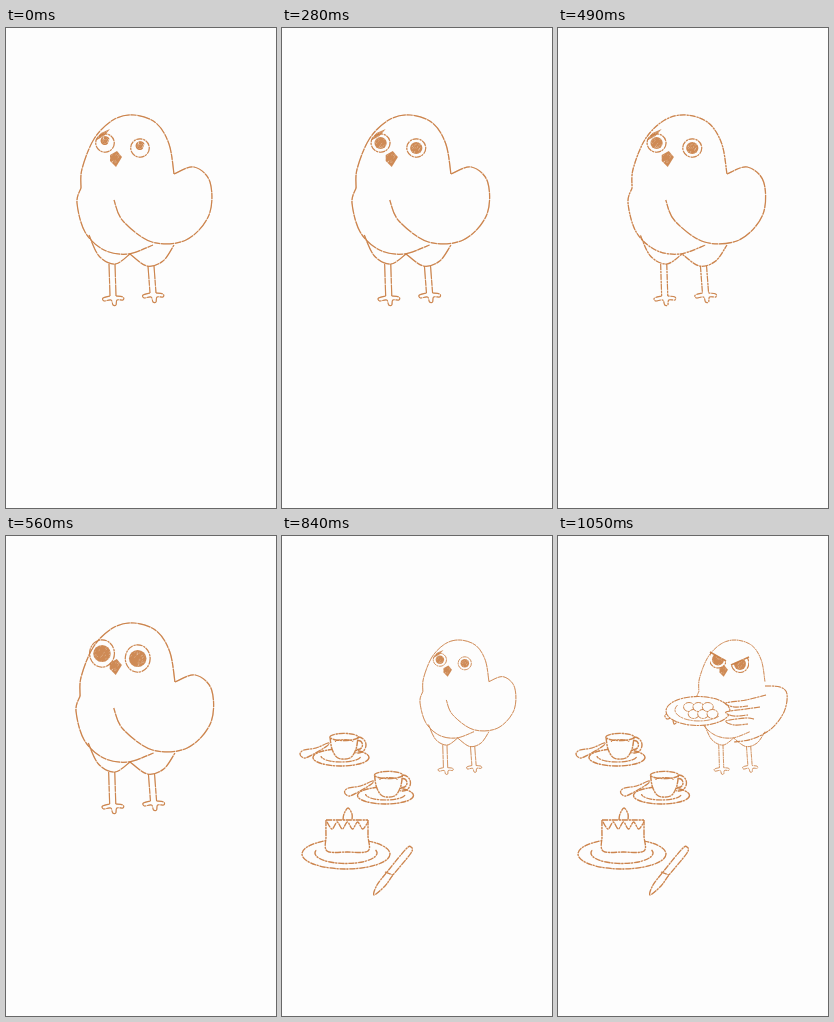
An HTML page with a canvas that plays this animation: 270x480 px, repeating every 1120 ms.

```html
<!DOCTYPE html>
<html lang="en">
<head>
<meta charset="utf-8">
<title>Owl and tea table</title>
<style>
html, body { margin: 0; width: 100%; height: 100%; overflow: hidden; background: #fdfdfd; }
canvas { display: block; width: 100vw; height: 100vh; }
</style>
</head>
<body>
<canvas id="stage"></canvas>
<script>
const W = 270, H = 480, STEP = 70, LOOP = 1120;
const INK = '#c97d42', PAPER = '#fdfdfd';
const FIRM = [13, .8, 6, 1], LOOSE = [6, 1.1, 2, .8];
const canvas = document.getElementById('stage');
const ctx = canvas.getContext('2d');
const ratio = window.devicePixelRatio || 1;
canvas.width = W * ratio;
canvas.height = H * ratio;

const points = text => text.split(' ').map(p => p.split(',').map(Number));

// Smooth curve through key points
function curve(keys, closed = false) {
  const p = typeof keys === 'string' ? points(keys) : keys;
  const n = p.length, path = new Path2D();
  const at = i => closed ? p[(i + n) % n] : p[Math.max(0, Math.min(n - 1, i))];
  path.moveTo(...p[0]);
  for (let i = 0; i < (closed ? n : n - 1); i++) {
    const a = at(i - 1), b = at(i), c = at(i + 1), d = at(i + 2);
    path.bezierCurveTo(b[0] + (c[0] - a[0]) / 6, b[1] + (c[1] - a[1]) / 6,
      c[0] - (d[0] - b[0]) / 6, c[1] - (d[1] - b[1]) / 6, c[0], c[1]);
  }
  return path;
}

function poly(text) {
  const path = new Path2D();
  points(text).forEach(p => path.lineTo(...p));
  return path;
}

function oval(x, y, rx, ry = rx, from = 0, to = Math.PI * 2) {
  const path = new Path2D();
  path.ellipse(x, y, rx, ry, 0, from, to);
  return path;
}

// Crayon line: faint base with broken darker strokes on top
function line(path, width = 1.25, dash = LOOSE, shift = 0) {
  ctx.lineWidth = width * .8;
  ctx.globalAlpha = .35;
  ctx.setLineDash([]);
  ctx.stroke(path);
  ctx.lineWidth = width;
  ctx.globalAlpha = .9;
  ctx.setLineDash(dash);
  ctx.lineDashOffset = shift;
  ctx.stroke(path);
  ctx.globalAlpha = 1;
  ctx.setLineDash([]);
}

// Outline that hides what lies behind it
function cover(path, width) {
  ctx.fillStyle = PAPER;
  ctx.fill(path);
  ctx.fillStyle = INK;
  line(path, width);
}

function random(seed) {
  return () => (seed = (seed * 16807) % 2147483647) / 2147483647;
}

// Solid patch with small gaps in the crayon
function shade(path, x, y, r) {
  const next = random(Math.round(x * 7 + y));
  ctx.save();
  ctx.globalAlpha = .9;
  ctx.fill(path);
  ctx.clip(path);
  ctx.globalAlpha = .5;
  ctx.strokeStyle = PAPER;
  ctx.lineWidth = .5;
  for (let i = 0; i < r * 4; i++) {
    const px = x + (next() * 2 - 1) * r, py = y + (next() * 2 - 1) * r;
    ctx.beginPath();
    ctx.moveTo(px, py);
    ctx.lineTo(px + 1.3, py - 1);
    ctx.stroke();
  }
  ctx.restore();
}

function spiral(x, y, r) {
  const path = new Path2D(), turns = 6 * Math.PI;
  for (let a = 0; a <= turns; a += .3) {
    path.lineTo(x + Math.cos(a) * r * a / turns, y + Math.sin(a) * r * a / turns);
  }
  line(path, 1.3, FIRM);
}

const head = curve('75,160 76,141 88,111 107,92 128,87 150,95 163,116 168,146');
const belly = curve('75,160 71,175 79,204 98,222 122,226 147,217');
const wing = curve('168,146 188,139 204,154 203,187 180,212 146,214 117,193 108,172');
const hips = [curve('83,207 93,228 109,236 124,226'), curve('124,226 141,238 157,233 168,217')];
const beak = poly('104,127 111,123 116,129 110,139 104,133');
const brow = poly('89,113 95,105 104,101 98,108');

function leg(x, top, bottom, lean, dash) {
  for (const side of [-3, 3]) line(poly(`${x + side},${top} ${x + side + lean},${bottom}`), 1.15, dash);
  const f = x + lean;
  const toes = [[-3, 0], [-10, 2], [-9, 5], [-2, 4], [0, 9], [3, 9], [4, 4], [10, 4], [10, 1], [3, 0]];
  line(curve(toes.map(([dx, dy]) => [f + dx, bottom + dy])), 1.15, dash);
}

function frame(tick) {
  const dash = tick % 2 ? LOOSE : FIRM, shift = tick % 2 * 5;
  [head, belly, ...hips].forEach((p, i) => line(p, 1.25, dash, shift + i * 7));
  leg(106, 236, 268, 1, dash);
  leg(145, 238, 265, 2, dash);
  shade(beak, 110, 131, 7);
}

// Pupils widen step by step, then the whole eye pops open
function eyes(tick, popped) {
  const pupil = popped ? 8.6 : Math.min(6, 4.5 + tick * .4);
  const up = tick < 2 ? 2 : 0, push = popped ? 2.5 : 0;
  for (const [x, y] of [[99, 115], [134, 120]]) {
    const cx = x - push, cy = y + push;
    line(oval(cx, cy, popped ? 12.2 : 9.3, popped ? 13.7 : 9.2), 1.15);
    if (up) spiral(cx, cy - up, pupil);
    else shade(oval(cx, cy, pupil), cx, cy, pupil);
  }
  if (!popped) shade(brow, 96, 107, 6);
}

function owl(tick, popped) {
  frame(tick);
  line(wing, 1.25, FIRM, tick % 2 * 5);
  eyes(tick, popped);
}

function placed(x, y, sx, sy, paint) {
  ctx.save();
  ctx.translate(x, y);
  ctx.scale(sx, sy);
  paint();
  ctx.restore();
}

const spoon = curve('46,207 34,212 22,214 18,218 22,222 30,219 45,210', true);
const bowl = curve('48,201 50,213 56,222 68,222 74,213 76,201');

function cup() {
  line(spoon);
  line(oval(59, 221.5, 28, 8.5), 1.35);
  line(oval(59, 220, 20, 6, .2, Math.PI), 1.2);
  for (const r of [8, 4.5]) line(oval(76, 209, r, r, -1.6, 1.9), 1.3);
  cover(bowl, 1.35);
  cover(oval(62, 201, 14, 3.6), 1.35);
  line(oval(62, 206, 9, 2.5, Math.PI, Math.PI * 2), 1);
}

function cake() {
  line(oval(64, 318, 44, 15), 1.3);
  line(oval(64, 317, 31, 10.5, -.3, Math.PI + .3), 1.3);
  cover(curve('44,284 44,300 45,315 65,316 86,315 86,300 86,284'), 1.3);
  const icing = [];
  for (let i = 0; i <= 8; i++) icing.push([45 + i * 5.1, i % 2 ? 293 : 286]);
  line(curve(icing), 1.3);
  line(poly('44,284 86,284'), 1.3);
  line(curve('61,284 62,278 66,272 70,278 70,284'), 1.3);
}

function knife() {
  line(curve('92,359 95,349 105,336 124,313 129,311 129,317 111,339 103,350', true), 1.3);
  line(poly('103,336 111,339'), 1.3);
}

function table() {
  cup();
  placed(44.5, 38, 1, 1, cup);
  cake();
  knife();
}

// Eye cut off by a slanted lid
function angryEye(x1, y1, x2, y2) {
  const x = (x1 + x2) / 2, y = (y1 + y2) / 2 + 2;
  ctx.save();
  ctx.clip(poly(`${x1},${y1} ${x2},${y2} ${x2},${y2 + 30} ${x1},${y1 + 30}`));
  line(oval(x, y, 8.8, 9.5), 1.1);
  shade(oval(x, y + 1, 6), x, y + 1, 6);
  ctx.restore();
  line(poly(`${x1},${y1} ${x2},${y2}`), 1.5, FIRM);
}

const servingWing = curve('207,150 222,151 229,158 226,176 213,193 194,203 176,206');

function platter() {
  line(servingWing, 1.1);
  line(curve('113,176 107,179 109,183 114,182 116,188 119,186'), 1.1);
  cover(oval(140, 175, 32, 14.5), 1.1);
  line(oval(141, 174, 24, 11, .6, 3.6), .8);
  for (let i = 0; i < 6; i++) {
    cover(oval(131 + i * 4.7, i % 2 ? 178 : 171, 5.5, 4.5), .9);
  }
  for (let i = 0; i < 3; i++) {
    const y = 167 + i * 9;
    cover(curve(`${208 - i * 6},${y - 8 + i * 3} 188,${y - 3} 168,${y} 176,${y + 4} 190,${y + 3}`), 1.1);
  }
}

function draw(time) {
  const tick = Math.floor(time / STEP);
  const tableSet = time >= 700, serving = time >= 980, popped = time >= 560;
  ctx.setTransform(ratio, 0, 0, ratio, 0, 0);
  ctx.fillStyle = PAPER;
  ctx.fillRect(0, 0, W, H);
  ctx.fillStyle = ctx.strokeStyle = INK;
  ctx.lineJoin = 'round';
  if (!tableSet) {
    const wide = tick < 3 ? 1 : 1.02;
    placed(121 - 121 * wide, 0, wide, 1, () => owl(popped ? 8 : tick, popped));
    return;
  }
  table();
  placed(87.5, 42.7, .711, .705, () => serving ? frame(tick) : owl(tick, false));
  if (serving) {
    angryEye(152, 116, 168, 125);
    angryEye(173, 129, 191, 121);
    platter();
  }
}

const start = performance.now();
function play() {
  draw((performance.now() - start) % LOOP);
  requestAnimationFrame(play);
}
play();
</script>
</body>
</html>
```
